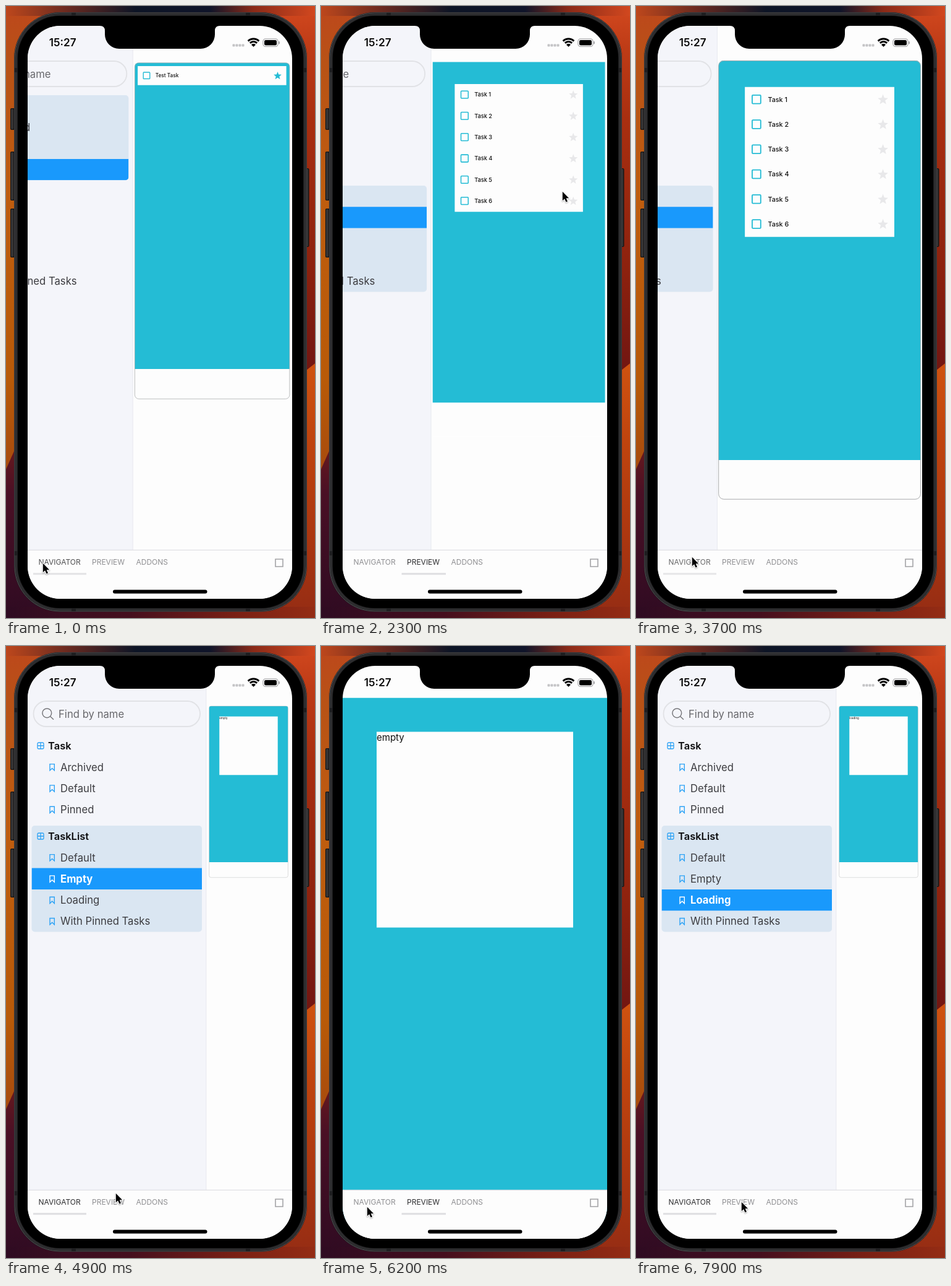
Animation of 500 by 988 pixels, one loop 8000 ms. Source, as an HTML page with a canvas:

```html
<!DOCTYPE html>
<html lang="en">
<head>
<meta charset="utf-8">
<title>Task preview</title>
<style>
html, body { margin: 0; width: 100%; height: 100%; overflow: hidden; background: #000; }
canvas { display: block; width: 500px; height: 988px; }
</style>
</head>
<body>
<canvas id="stage"></canvas>
<script>
const LOOP = 8000, SLIDE = 400;
const TEAL = '#24bcd5', BLUE = '#1999fc', WHITE = '#fdfdfd';
const FONT = 'Inter, "Liberation Sans", sans-serif';

const canvas = document.getElementById('stage');
const ratio = window.devicePixelRatio || 1;
canvas.width = 500 * ratio;
canvas.height = 988 * ratio;
const c = canvas.getContext('2d');

// [time, drawer open]
const slides = [[-221, 1], [2100, 0], [3543, 1], [5200, 0], [6250, 1]];
// [time, group, row]
const picks = [[-1000, 0, 2], [1200, 1, 0], [4450, 1, 1], [7150, 1, 2]];
// [time, x, y]
const pointer = [
  [0, 59, 899], [200, 59, 899], [900, 99, 339], [1250, 99, 339],
  [1900, 390, 299], [2500, 390, 299], [3300, 90, 889], [3800, 90, 889],
  [4250, 98, 372], [4550, 98, 372], [4900, 177, 883], [5050, 170, 897],
  [5400, 170, 897], [6100, 74, 905], [6450, 74, 905], [7000, 100, 406],
  [7300, 100, 406], [7850, 170, 897], [8000, 170, 897]
];
const groups = [
  { name: 'Task', y: 144, rows: ['Archived', 'Default', 'Pinned'] },
  { name: 'TaskList', y: 290, rows: ['Default', 'Empty', 'Loading', 'With Pinned Tasks'] }
];
const ROW = 34.3, DRAWER = 289.3;

const clamp = v => Math.max(0, Math.min(1, v));
const latest = (list, t) => list.filter(e => e[0] <= t).pop();
const easeInOut = k => k < 0.5 ? (2 * k) ** 1.7 / 2 : 1 - (2 - 2 * k) ** 1.7 / 2;

function box(x, y, w, h, fill, r = 0) {
  c.beginPath();
  c.roundRect(x, y, w, h, r);
  c.fillStyle = fill;
  c.fill();
}

function frame(x, y, w, h, color, width, r = 0) {
  c.beginPath();
  c.roundRect(x, y, w, h, r);
  c.strokeStyle = color;
  c.lineWidth = width;
  c.stroke();
}

function line(points, color, width, close) {
  c.beginPath();
  points.forEach(([x, y]) => c.lineTo(x, y));
  if (close) c.closePath();
  c.strokeStyle = color;
  c.lineWidth = width;
  c.stroke();
}

function shape(points, fill) {
  c.beginPath();
  points.forEach(([x, y]) => c.lineTo(x, y));
  c.closePath();
  c.fillStyle = fill;
  c.fill();
}

function label(str, x, y, size, color, weight = 400) {
  c.font = `${weight} ${size}px ${FONT}`;
  c.fillStyle = color;
  c.fillText(str, x, y);
}

function gradient(x0, y0, x1, y1, ...stops) {
  const g = c.createLinearGradient(x0, y0, x1, y1);
  stops.forEach(([at, color]) => g.addColorStop(at, color));
  return g;
}

function wallpaper() {
  box(0, 0, 250, 988, gradient(0, 0, 0, 760,
    [0, '#bd471c'], [0.12, '#b85216'], [0.4, '#bf5d0e'], [0.8, '#b85a08'], [1, '#a64a0e']));
  shape([[0, 748], [16, 712], [60, 640], [250, 640], [250, 988], [0, 988]],
    gradient(0, 700, 0, 988, [0, '#6c1a1c'], [0.3, '#4a1025'], [1, '#2f0b22']));
  box(250, 0, 250, 988, gradient(0, 0, 0, 600,
    [0, '#d2481f'], [0.12, '#bd3b16'], [0.3, '#a92f10'], [0.7, '#8d220e'], [1, '#701512']));
  shape([[500, 577], [486, 588], [400, 660], [400, 988], [500, 988]],
    gradient(0, 580, 0, 988, [0, '#cf5210'], [0.3, '#bf440e'], [0.7, '#aa3610'], [1, '#942c14']));
  box(0, 0, 500, 16, gradient(0, 0, 500, 0,
    [0, '#bd471c'], [0.2, '#6a2a20'], [0.42, '#0d1526'], [0.66, '#10152a'], [0.8, '#8a2a18'], [1, '#d2481f']));
  box(0, 970, 500, 18, gradient(0, 0, 500, 0,
    [0, '#2f0b22'], [0.4, '#450f1e'], [0.75, '#7a2014'], [1, '#942c14']));
}

function phone() {
  [[165, 35], [235, 79], [327, 79]].forEach(([y, h]) => {
    box(7, y, 9, h, '#161617', 2);
    box(8, y + 1, 4, h - 2, '#353435', 2);
  });
  box(483, 262, 7.5, 127, '#161617', 2);
  box(486, 263, 3, 125, '#353435', 1);
  box(13, 10, 474, 968, '#1b1b1c', 74);
  frame(14, 11, 472, 966, '#555558', 1, 73);
  frame(16.5, 13.5, 467, 961, '#2d2d2f', 3.5, 71);
  [103, 883].forEach(y => {
    box(14, y - 3, 5, 7, '#1e1e20');
    box(481, y - 3, 5, 7, '#1e1e20');
  });
  [109, 391].forEach(x => {
    box(x - 3, 11, 7, 5, '#1e1e20');
    box(x - 3, 972, 7, 5, '#1e1e20');
  });
  box(19, 16, 462, 956, '#000', 68);
}

function statusBar() {
  c.beginPath();
  c.moveTo(152, 30);
  c.lineTo(152, 32);
  c.quadraticCurveTo(160, 32, 160, 40);
  c.lineTo(160, 46);
  c.arcTo(160, 69, 184, 69, 23);
  c.lineTo(315, 69);
  c.arcTo(338, 69, 338, 46, 23);
  c.lineTo(338, 40);
  c.quadraticCurveTo(338, 32, 346, 32);
  c.lineTo(346, 30);
  c.fillStyle = '#000';
  c.fill();

  label('15:27', 69.7, 65.4, 17.2, '#0c0c0c', 600);
  for (let i = 0; i < 4; i++) box(366.5 + i * 5, 61.5, 4, 4, '#c4c4c6', 1);
  [12.5, 8].forEach(r => {
    c.beginPath();
    c.arc(400.5, 65.5, r, -Math.PI * 0.75, -Math.PI * 0.25);
    c.strokeStyle = '#000';
    c.lineWidth = 3;
    c.stroke();
  });
  c.beginPath();
  c.moveTo(400.5, 66);
  c.arc(400.5, 66, 5, -Math.PI * 0.75, -Math.PI * 0.25);
  c.fillStyle = '#000';
  c.fill();
  frame(416, 53, 24, 12.5, '#9c9c9e', 1.1, 4);
  box(418, 55, 20, 8.5, '#000', 2.2);
  box(441.3, 57, 1.6, 4.5, '#9c9c9e', 1);
}

function gridIcon(y) {
  frame(51, y - 5, 10, 10, '#2ea3f5', 1.3, 2);
  line([[56, y - 5], [56, y + 5]], '#2ea3f5', 1.3);
  line([[51, y], [61, y]], '#2ea3f5', 1.3);
}

function bookmark(y, color) {
  line([[71, y - 5], [78.3, y - 5], [78.3, y + 5.3], [74.65, y + 1.8], [71, y + 5.3]], color, 1.4, true);
}

function drawer(open, pick, t) {
  c.save();
  c.translate((open - 1) * DRAWER, 0);
  box(35, 32, DRAWER, 847, '#f4f5fa');
  box(34 + DRAWER, 32, 1, 847, '#e9eaef');
  frame(44.5, 89, 269.5, 41, '#e1e2e6', 1.8, 20.5);
  c.beginPath();
  c.arc(66.3, 108.3, 7.4, 0, 7);
  c.strokeStyle = '#77777b';
  c.lineWidth = 1.5;
  c.stroke();
  line([[71.7, 113.7], [77, 118.7]], '#77777b', 1.5);
  label('Find by name', 85, 115.5, 16.7, '#68686c');

  groups.forEach((g, gi) => {
    const active = gi === pick[1];
    const height = (g.rows.length + 1) * ROW;
    c.save();
    if (active) {
      box(41.5, g.y, 275.5, height, '#dae6f2', 5);
      c.clip();
    }
    gridIcon(g.y + 17);
    label(g.name, 68, g.y + 23, 16.5, '#0c0c0e', 600);
    g.rows.forEach((name, ri) => {
      const top = g.y + (ri + 1) * ROW;
      const on = active && ri === pick[2];
      const pressed = picks.some(p => p[1] === gi && p[2] === ri && t >= p[0] - 150 && t < p[0]);
      if (on) box(41.5, top, 275.5, ROW, BLUE);
      c.globalAlpha = pressed ? 0.65 : 1;
      bookmark(top + 17.3, on ? '#fff' : '#2ea3f5');
      label(name, 88, top + 23.2, 16.7, on ? '#fff' : '#3c3c40', on ? 700 : 400);
      c.globalAlpha = 1;
    });
    c.restore();
  });
  c.restore();
}

function star(x, y, r, color) {
  const points = [];
  for (let i = 0; i < 10; i++) {
    const a = i * Math.PI / 5 - Math.PI / 2, d = i % 2 ? r * 0.43 : r;
    points.push([x + d * Math.cos(a), y + d * Math.sin(a)]);
  }
  shape(points, color);
}

function task(x, y, name, width, starColor) {
  frame(x + 15.5, y - 9, 18, 18, TEAL, 2.4, 1.5);
  label(name, x + 48.7, y + 5, 14.1, '#111', 500);
  star(x + width - 24, y + 0.8, 11.5, starColor);
}

function story(pick, width) {
  const [, group, row] = pick;
  if (group === 0) {
    box(7.5, 8.5, width - 16, 52.5, WHITE);
    task(7.5, 34.5, 'Test Task', width - 16, TEAL);
    return;
  }
  box(55, 55, width - 110, 316, WHITE);
  if (row === 0) {
    for (let i = 0; i < 6; i++) task(55, 81 + i * 52.6, `Task ${i + 1}`, width - 110, '#e8e8ea');
  } else {
    label(row === 1 ? 'empty' : 'loading', 55, 69, 15, '#111');
  }
}

function preview(open, toDrawer, pick) {
  const s = 1 - 0.701 * open;
  const border = toDrawer ? 1 : 0;
  c.save();
  c.translate(35 + 293.5 * open, 83.5 + 13.5 * open);
  c.scale(s, s);
  c.save();
  c.beginPath();
  c.roundRect(0, 0, 428, 926, border * 11);
  c.clip();
  box(0, 0, 428, 926, WHITE);
  box(0, 0, 428, 843, TEAL);
  c.translate(border, border);
  story(pick, 428 - 2 * border);
  c.restore();
  if (border) frame(0.5, 0.5, 427, 925, '#a9abad', 1.3, 11);
  c.restore();
}

function footer(toDrawer, since) {
  box(35, 878, 428, 80, WHITE);
  box(35, 877.7, 428, 1.2, '#e0e0e4');
  const tabs = [['NAVIGATOR', 52.5, 44, 86], ['PREVIEW', 139, 130.5, 71.5], ['ADDONS', 210.5]];
  tabs.forEach(([name, x, left, width], i) => {
    const on = i === (toDrawer ? 0 : 1);
    c.globalAlpha = on && toDrawer ? 0.4 + 0.6 * clamp(since / 300) : 1;
    label(name, x, 902, 12, on ? '#2e2e30' : '#8f8f92');
    if (on) box(left, 915.3, width, 3, '#dedee1');
    c.globalAlpha = 1;
  });
  frame(436, 893, 12, 12, '#a4a4a7', 1.6);
  box(173, 942.5, 152.5, 6, '#000', 3);
}

function cursor(t) {
  const i = Math.max(1, pointer.findIndex(p => p[0] > t));
  const [t0, x0, y0] = pointer[i - 1], [t1, x1, y1] = pointer[i];
  const k = easeInOut(clamp((t - t0) / (t1 - t0)));
  const arrow = [[0, 0], [0, 14.5], [3.3, 11.5], [5.7, 16.8], [8.2, 15.7], [5.9, 10.5], [10.4, 10.5]];
  c.save();
  c.translate(x0 + (x1 - x0) * k + 0.8, y0 + (y1 - y0) * k + 0.8);
  c.lineJoin = 'round';
  c.shadowColor = 'rgba(0,0,0,.3)';
  c.shadowBlur = 2;
  c.shadowOffsetY = 1;
  line(arrow, '#fff', 2.2, true);
  c.shadowColor = 'transparent';
  shape(arrow, '#000');
  c.restore();
}

function draw(t) {
  const [start, toDrawer] = latest(slides, t);
  const k = easeInOut(clamp((t - start) / SLIDE));
  const open = toDrawer ? k : 1 - k;
  const pick = latest(picks, t);

  c.setTransform(ratio, 0, 0, ratio, 0, 0);
  wallpaper();
  phone();
  c.save();
  c.beginPath();
  c.roundRect(35, 32, 428, 925, 53);
  c.clip();
  box(35, 32, 428, 925, WHITE);
  drawer(open, pick, t);
  preview(open, toDrawer, pick);
  footer(toDrawer, t - start);
  c.restore();
  statusBar();
  cursor(t);
}

const begin = performance.now();
function tick() {
  draw((performance.now() - begin) % LOOP);
  requestAnimationFrame(tick);
}
tick();
</script>
</body>
</html>
```
